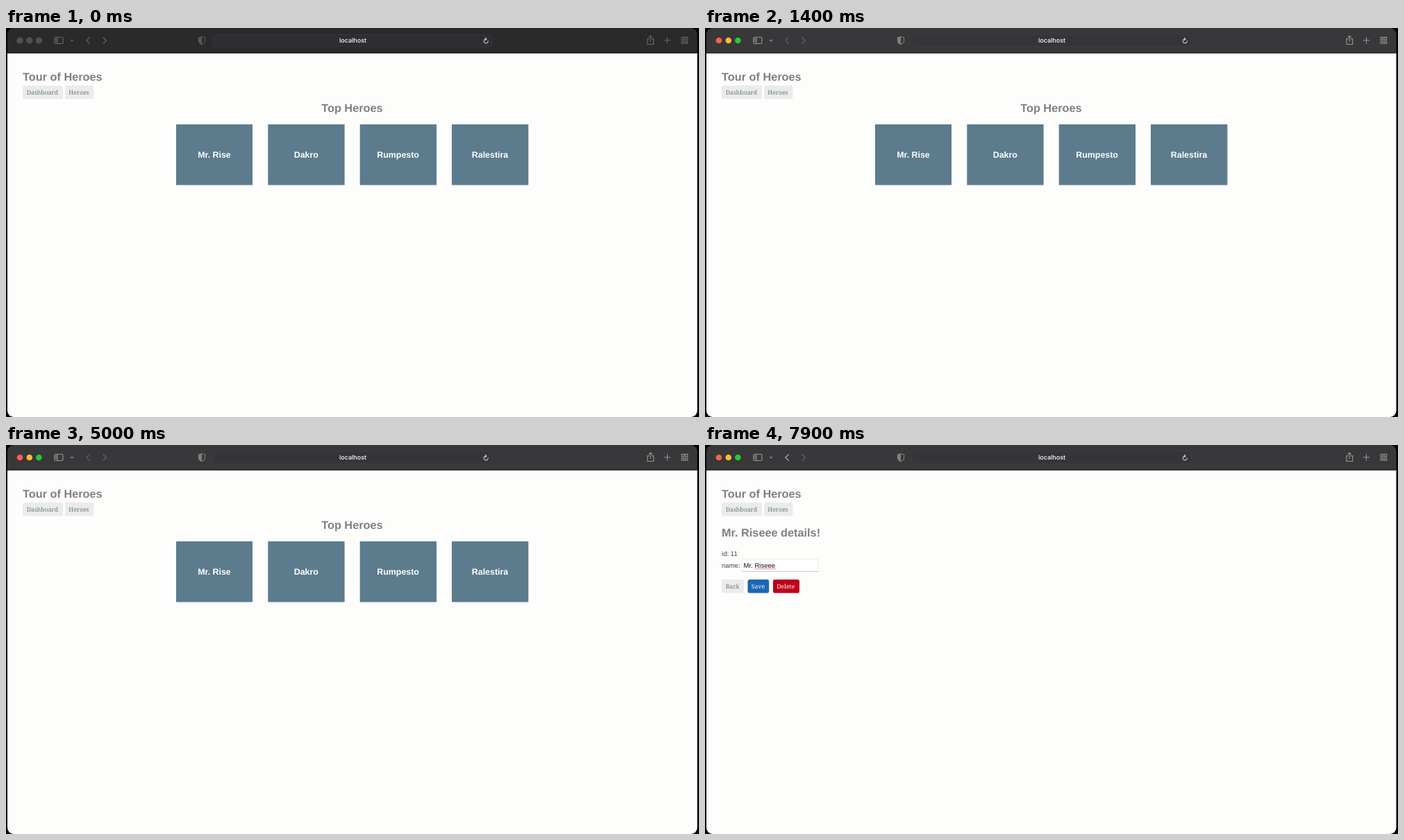
These frames come from a looping animation (998x561 px, 8 s). An HTML page:

```html
<!DOCTYPE html>
<html lang="en">
<head>
<meta charset="utf-8">
<title>Tour of Heroes</title>
<style>
html, body { margin: 0; width: 100%; height: 100%; overflow: hidden; background: #000; }
svg { display: block; width: 998px; height: 561px; text-rendering: geometricPrecision; }
text { font-family: "Liberation Sans", Arial, sans-serif; }
.h { font-size: 16.3px; font-weight: bold; fill: #808080; }
.label { font-size: 9.6px; fill: #444; }
.value { font-size: 9.54px; fill: #111; }
.btn text { font: 8.7px "Noto Serif", Georgia, serif; fill: #5f7f70; }
.btn rect { fill: #ebebeb; }
.btn.solid text { fill: #fff; }
.url { font: 500 9px Inter, Roboto, sans-serif; fill: #fff; text-anchor: middle; }
.icon { fill: none; stroke: currentColor; stroke-width: 1.1; stroke-linecap: round; stroke-linejoin: round; }

/* every change is a hard cut on one 8 s clock */
.a, .card { animation: 8s step-end infinite; }
.card { fill: #5c7b8c; color: #fff; }
.card text { fill: currentColor; font-size: 12.4px; font-weight: bold; text-anchor: middle; }

.chrome { animation-name: chrome; }
.unfocused { animation-name: unfocused; }
.blackout { animation-name: blackout; }
.list { animation-name: list; }
.detail { animation-name: detail; }
.back { animation-name: back; }
.c1 { animation-name: c1; }
.c2 { animation-name: c2; }
.c3 { animation-name: c3; }
.c4 { animation-name: c4; }
.n1 { animation-name: n1; }
.n2 { animation-name: n2; }
.n3 { animation-name: n3; }
.typo { animation-name: typo; }
.btn .save { fill: #1976d2; animation-name: save; }
.btn .delete { fill: #c0001a; animation-name: del; }

@keyframes chrome { 0% { fill: #2b2a2b; color: #686868; } 16.25%, 100% { fill: #383739; color: #979797; } }
@keyframes unfocused { 0% { visibility: visible; } 16.25%, 100% { visibility: hidden; } }
@keyframes blackout { 0% { visibility: hidden; } 16.25% { visibility: visible; } 17.5%, 100% { visibility: hidden; } }
@keyframes list { 0% { visibility: visible; } 70%, 100% { visibility: hidden; } }
@keyframes detail { 0% { opacity: 0; } 70%, 100% { opacity: 1; } }
@keyframes back { 0% { color: #5c5c5c; } 70%, 100% { color: #a6a6a6; } }

@keyframes c1 {
  0%, 48.75% { fill: #5c7b8c; color: #fff; }
  41.25%, 66.25%, 100% { fill: #ececec; color: #607d8b; }
}
@keyframes c2 {
  0%, 52.5%, 100% { fill: #5c7b8c; color: #fff; }
  48.75% { fill: #ececec; color: #607d8b; }
}
@keyframes c3 {
  0%, 55%, 100% { fill: #5c7b8c; color: #fff; }
  52.5% { fill: #ececec; color: #607d8b; }
}
@keyframes c4 {
  0%, 60%, 100% { fill: #5c7b8c; color: #fff; }
  56.25% { fill: #ececec; color: #607d8b; }
}

@keyframes n1 { 0% { visibility: visible; } 87.5%, 100% { visibility: hidden; } }
@keyframes n2 { 0% { visibility: hidden; } 87.5% { visibility: visible; } 90%, 100% { visibility: hidden; } }
@keyframes n3 { 0% { visibility: hidden; } 90%, 100% { visibility: visible; } }
@keyframes typo { 0% { visibility: hidden; } 95%, 100% { visibility: visible; } }
@keyframes save { 0% { fill: #1976d2; } 96.25%, 100% { fill: #1a66b5; } }
@keyframes del { 0%, 77.5%, 100% { fill: #c0001a; } 75% { fill: #b00018; } }
</style>
</head>
<body>
<svg viewBox="0 0 998 561">
  <defs>
    <clipPath id="win"><rect x="2" y="0" width="993.5" height="561" rx="9"/></clipPath>
  </defs>
  <rect width="998" height="561"/>

  <g clip-path="url(#win)">
    <rect y="36" width="998" height="525" fill="#fdfdfc"/>

    <!-- browser bar -->
    <g class="a chrome">
      <rect width="998" height="36"/>
      <rect y="35.4" width="998" height="1.2" fill="#111"/>
      <rect x="298.5" y="9.5" width="401" height="17.5" rx="4" fill="#343238" fill-opacity=".45" stroke="#45434a" stroke-opacity=".4"/>
      <g class="icon">
        <rect x="69.8" y="13.3" width="12.2" height="9.2" rx="1.6"/>
        <path d="M74 13.3v9.2M71.3 15.6h1.2M71.3 17.5h1.2M71.3 19.4h1.2"/>
        <path d="M93.3 17.2l1.7 1.7 1.7-1.7"/>
        <path d="M282 12.4l4.6 1.5v4.3c0 2.700-2 4.300-4.600 5.500c-2.600-1.200-4.600-2.800-4.600-5.500v-4.300z" opacity=".75"/>
        <path d="M282 12.400l-4.600 1.500v4.300c0 2.700 2 4.300 4.600 5.500z" fill="currentColor" stroke="none" opacity=".75"/>
        <path d="M694.2 18.6a3 3 0 1 1-2.900-2.700M690.400 14.200l1.700 1.700-1.700 1.700" stroke="#c8c8c8"/>
        <path d="M926 15.600h-2.200v7.900h8.800v-7.900h-2.200M928.200 19.500v-8.200M926 13.300l2.200-2.100 2.200 2.100"/>
        <path d="M952.400 13.500v8.600M948.100 17.800h8.600"/>
        <path d="M973 13.400h3.400v3.400h-3.400zM978.300 13.400h3.400v3.400h-3.400zM973 18.700h3.400v3.400h-3.400zM978.300 18.700h3.400v3.400h-3.400z"/>
        <path d="M140 13.800l4.500 4.200-4.500 4.200" stroke="#646464" stroke-width="1.300"/>
        <path class="a back" d="M120.300 13.800l-4.500 4.200 4.500 4.200" stroke-width="1.300"/>
      </g>
      <text class="url" x="499.500" y="21.300">localhost</text>
    </g>
    <circle cx="20" cy="18" r="4.300" fill="#ff5f57"/>
    <circle cx="33.800" cy="18" r="4.300" fill="#febc2e"/>
    <circle cx="47.400" cy="18" r="4.300" fill="#28c840"/>
    <g class="a unfocused" fill="#505050">
      <circle cx="20" cy="18" r="4.600"/>
      <circle cx="33.800" cy="18" r="4.600"/>
      <circle cx="47.400" cy="18" r="4.600"/>
    </g>

    <!-- page header -->
    <text class="h" x="24" y="76">Tour of Heroes</text>
    <g class="btn">
      <rect x="24" y="83" width="58" height="19.500" rx="2.800"/>
      <text x="29.700" y="96">Dashboard</text>
      <rect x="85" y="83" width="41.300" height="19.500" rx="2.800"/>
      <text x="90.300" y="96">Heroes</text>
    </g>

    <!-- dashboard -->
    <g class="a list">
      <text class="h" x="498.400" y="121" text-anchor="middle">Top Heroes</text>
      <g class="card c1"><rect x="245" y="139" width="110" height="87.500"/><text x="300" y="187">Mr. Rise</text></g>
      <g class="card c2"><rect x="377.300" y="139" width="110.300" height="87.500"/><text x="432.300" y="187">Dakro</text></g>
      <g class="card c3"><rect x="509.700" y="139" width="110.300" height="87.500"/><text x="564.600" y="187">Rumpesto</text></g>
      <g class="card c4"><rect x="642" y="139" width="110.300" height="87.500"/><text x="697" y="187">Ralestira</text></g>
    </g>

    <!-- hero detail -->
    <g class="a detail">
      <text class="label" x="24" y="160">id: 11</text>
      <text class="label" x="24" y="176.700">name:</text>
      <rect x="53.800" y="164.300" width="108.700" height="18" fill="#fff" stroke="#e6e6e2" stroke-width=".8"/>
      <path d="M53.500 182.400h109.300" stroke="#bcbcc4" stroke-width=".8"/>
      <g class="a n1">
        <text class="h" x="24" y="132">Mr. Rise details!</text>
        <text class="value" x="55.500" y="176.700">Mr. Rise</text>
      </g>
      <g class="a n2">
        <text class="h" x="24" y="132">Mr. Risee details!</text>
        <text class="value" x="55.500" y="176.700">Mr. Risee</text>
      </g>
      <g class="a n3">
        <text class="h" x="24" y="132">Mr. Riseee details!</text>
        <text class="value" x="55.500" y="176.700">Mr. Riseee</text>
      </g>
      <path class="a typo" d="M72.500 178.600h29.500" stroke="#f0504a" stroke-width="1.200" stroke-dasharray="1.300 1.100"/>
      <g class="btn">
        <rect x="24" y="194" width="32" height="19.500" rx="2.800"/>
        <text x="29.700" y="207">Back</text>
      </g>
      <g class="btn solid">
        <rect class="a save" x="61.500" y="194" width="30.700" height="19.500" rx="2.800"/>
        <text x="66.800" y="207">Save</text>
        <rect class="a delete" x="98" y="194" width="38" height="19.500" rx="2.800"/>
        <text x="103.300" y="207">Delete</text>
      </g>
    </g>

    <g class="a blackout">
      <rect width="998" height="561"/>
      <rect width="998" height="10.400" fill="#38383a"/>
    </g>
  </g>
</svg>
</body>
</html>
```
